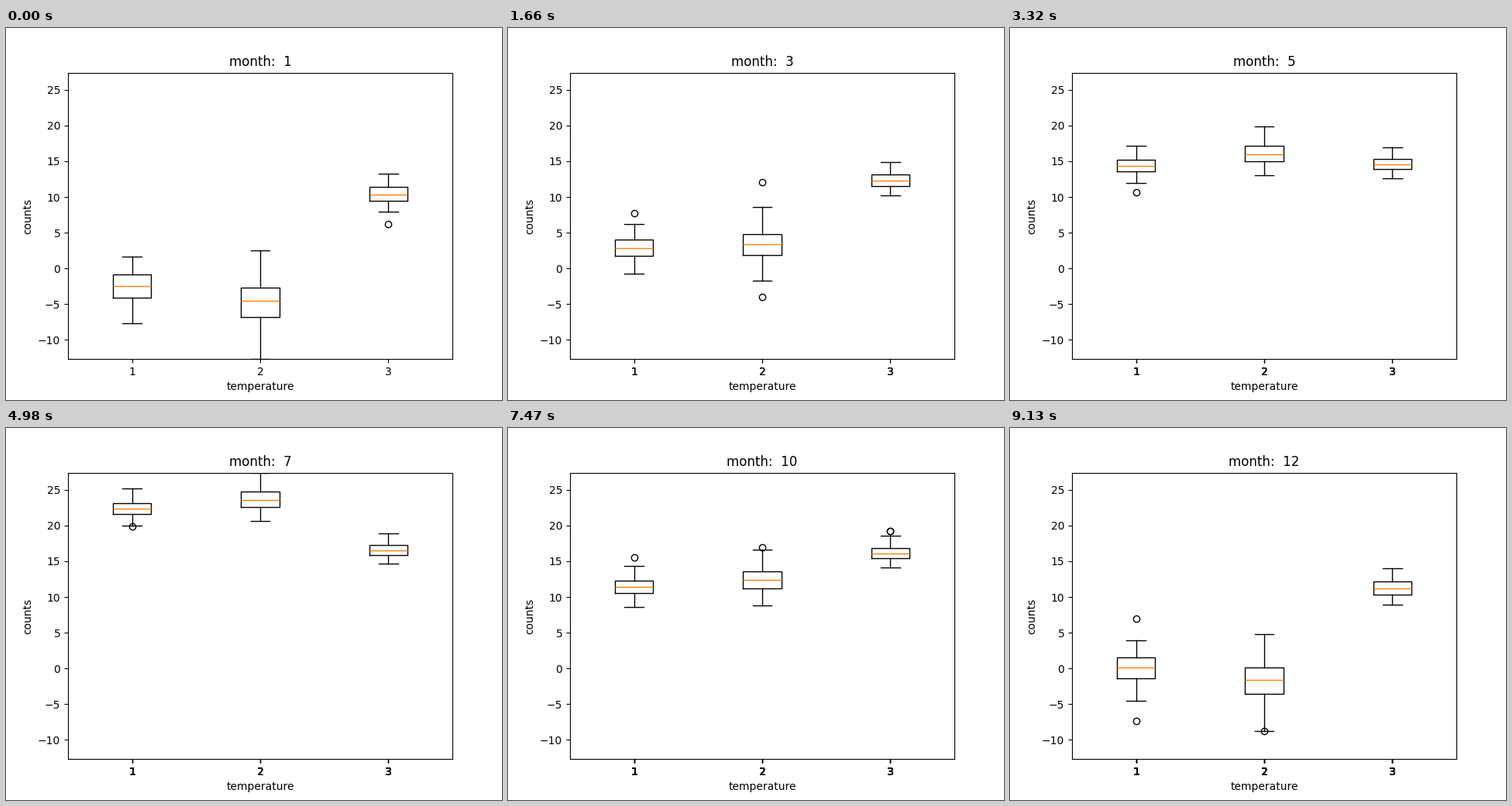
Recreate the animation shown at these times as a matplotlib script. Size 640x480 px, loop 9.96 s.

```python
import matplotlib.pyplot as plt
import numpy as np
from matplotlib.animation import FuncAnimation

MONTHS = 12
KEYS = ("whislo", "q1", "med", "q3", "whishi")

# Yearly wave of each median: mean, cos, sin, cos 2x, sin 2x, cos 3x.
WAVES = np.array([
    (9.92, -12.16, -1.49, 0.04, 0.08, -0.26),
    (10.34, -13.73, -1.21, -0.81, 0.29, -0.32),
    (14.14, -3.13, -1.23, -0.71, 0.53, 0.03),
])

# Distance of whiskers and quartiles from the median, and its growth in winter.
SPREAD = np.array([
    (-2.4, -0.75, 0, 0.8, 2.8),
    (-2.9, -0.95, 0, 1.15, 3.83),
    (-1.9, -0.65, 0, 0.7, 2.4),
])
WINTER = np.array([
    (-2.8, -0.85, 0, 0.85, 1.3),
    (-5.28, -1.3, 0, 0.7, 3.2),
    (-0.5, -0.25, 0, 0.35, 0.5),
])

# Stray points by (month, box).
STRAYS = {
    (1, 3): [6.2],
    (3, 1): [7.7], (3, 2): [12.1, -4.0],
    (5, 1): [10.7], (7, 1): [19.9], (9, 1): [20.5],
    (10, 1): [15.5], (10, 2): [17.0], (10, 3): [19.24, 19.2],
    (12, 1): [7.0, -7.4], (12, 2): [-8.8],
}


def box_stats(month):
    x = 2 * np.pi * (month - 1) / MONTHS
    basis = [1, np.cos(x), np.sin(x), np.cos(2 * x), np.sin(2 * x), np.cos(3 * x)]
    cold = np.cos(x / 2) ** 6
    rows = (WAVES @ basis)[:, None] + SPREAD + cold * WINTER
    return [dict(zip(KEYS, row), fliers=STRAYS.get((month, box), []))
            for box, row in enumerate(rows, 1)]


fig, ax = plt.subplots(figsize=(6.4, 4.8), dpi=100)


def update(frame):
    month = frame + 1
    ax.clear()
    ax.bxp(box_stats(month), manage_ticks=False)
    # Ticks pile up month by month, so their labels grow heavier.
    ax.set_xticks([1, 2, 3] * month, ["1", "2", "3"] * month)
    ax.set_xlim(0.5, 3.5)
    ax.set_ylim(-12.696, 27.414)
    ax.set_xlabel("temperature")
    ax.set_ylabel("counts")
    ax.set_title(f"month:  {month}")


anim = FuncAnimation(fig, update, frames=MONTHS, interval=830,
                     init_func=lambda: None, repeat=True, repeat_delay=0)
plt.show()
```
